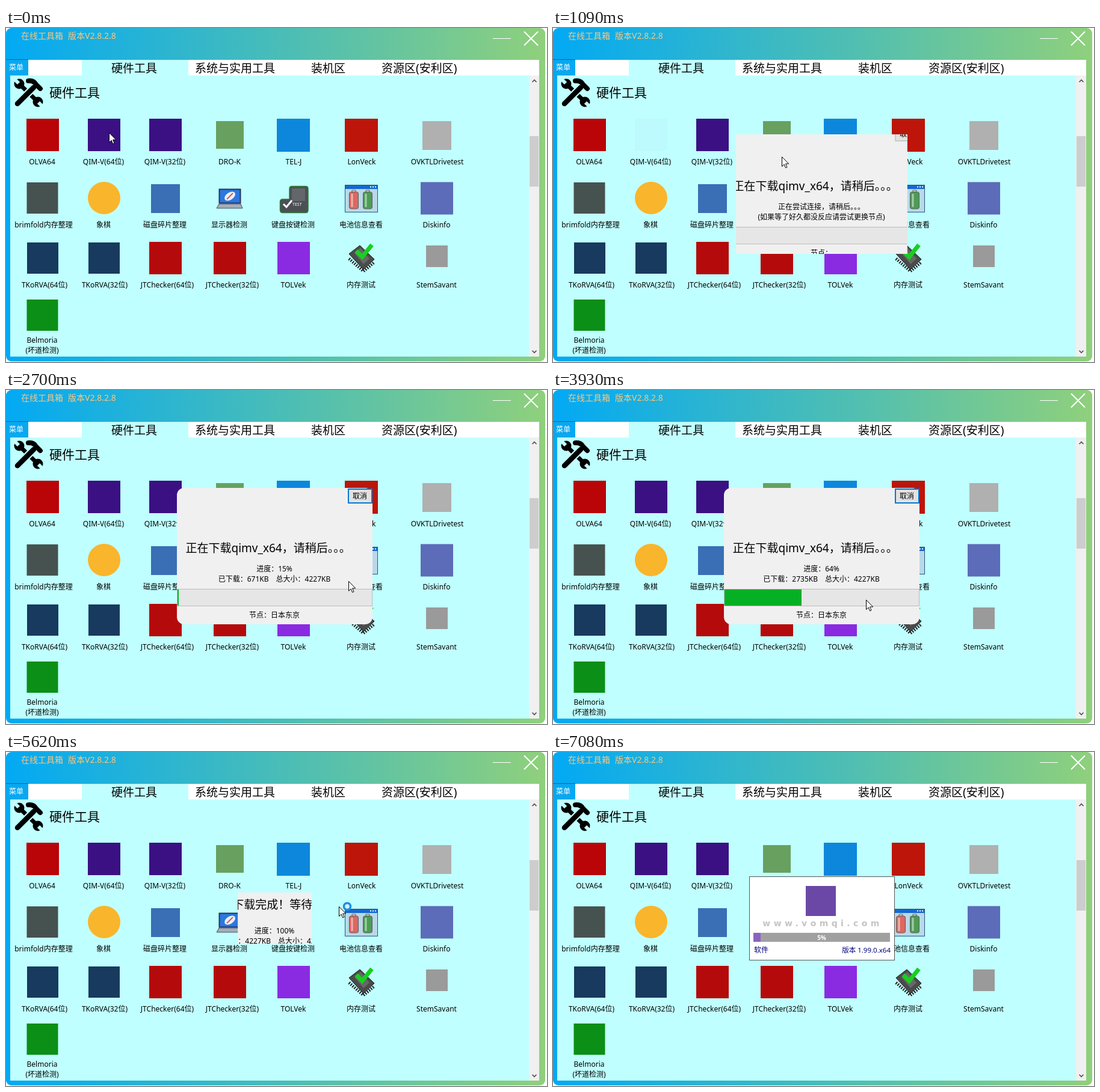
Write an HTML page that moves like this. It is 899 px wide and 556 px high and loops after 7770 ms.

```html
<!DOCTYPE html>
<html lang="zh-CN">
<head>
<meta charset="utf-8">
<title>在线工具箱</title>
<style>
html, body { margin: 0; width: 100%; height: 100%; overflow: hidden; background: #fff; }
svg { display: block; width: 899px; height: 556px; }
text { font: 12px 'Noto Sans', 'Noto Sans CJK SC', 'Noto Sans CJK', sans-serif; }
.tab { font-size: 19px; }
.mid { text-anchor: middle; }
.url { font: bold 14px 'DejaVu Sans', sans-serif; letter-spacing: 5.4px; }
</style>
</head>
<body>
<svg viewBox="0 0 899 556" xmlns="http://www.w3.org/2000/svg">
  <defs>
    <linearGradient id="frame"><stop stop-color="#02a9f4"/><stop offset="1" stop-color="#8fd07c"/></linearGradient>
    <linearGradient id="shine">
      <stop stop-color="#fff" stop-opacity="0"/>
      <stop offset=".55" stop-color="#fff" stop-opacity=".45"/>
      <stop offset="1" stop-color="#fff" stop-opacity="0"/>
    </linearGradient>
    <clipPath id="reveal"><rect id="revealBox"/></clipPath>
    <clipPath id="fill"><rect id="fillBox" x="285" y="332" height="27"/></clipPath>
  </defs>

  <!-- window -->
  <rect width="896" height="555" rx="9" fill="url(#frame)"/>
  <rect x="7" y="53" width="879" height="494" fill="#fff"/>
  <rect x="126" y="53" width="177" height="27" fill="#c0ffff"/>
  <rect x="7" y="79" width="862" height="468" fill="#c0ffff"/>
  <rect y="53" width="37" height="26" fill="#08a8f0"/>
  <path d="M0 52.5H37" stroke="#17608a"/>
  <text x="5" y="70" fill="#fff">菜单</text>
  <g fill="#ffc67c">
    <text x="25" y="17.5" style="font-size:14px">在线工具箱</text>
    <text x="103" y="17.5" style="font-size:14px">版本V2.8.2.8</text>
  </g>
  <path d="M809 17.5H839" stroke="#fff"/>
  <path d="M861 6L884 29M884 6L861 29" stroke="#fff" stroke-width="2"/>
  <text class="tab" x="175" y="74">硬件工具</text>
  <text class="tab" x="314" y="74">系统与实用工具</text>
  <text class="tab" x="507" y="74">装机区</text>
  <text class="tab" x="624" y="74">资源区(安利区)</text>
  <rect x="869" y="79" width="17" height="468" fill="#f0f0f0"/>
  <rect x="870" y="180" width="15" height="84" fill="#cdcdcd"/>
  <path d="M874.5 90L878 86.5L881.5 90M874.5 537L878 540.5L881.5 537" fill="none" stroke="#505050" stroke-width="1.7"/>

  <!-- heading -->
  <g fill="none" stroke-linecap="round">
    <path d="M23 94L53 123" stroke="#000" stroke-width="7"/>
    <g fill="#000"><circle cx="22" cy="93" r="8.5"/><circle cx="53" cy="123" r="8.5"/></g>
    <path d="M15 86L21 92M60 130L54 124" stroke="#c0ffff" stroke-width="6" stroke-linecap="butt"/>
    <path d="M19 126L46 99" stroke="#c0ffff" stroke-width="13"/>
    <path d="M19 126L46 99" stroke="#000" stroke-width="8.5"/>
    <path d="M37 88Q46 87 50 94L57 101" stroke="#000" stroke-width="8"/>
  </g>
  <text x="72" y="115" style="font-size:21px">硬件工具</text>

  <g id="icons"></g>
  <g id="labels" class="mid"></g>

  <!-- pictograms -->
  <g>
    <rect x="354.5" y="268.5" width="35" height="23" fill="#2b78e0" stroke="#26365e" stroke-width="2"/>
    <ellipse cx="372" cy="280" rx="10" ry="6" transform="rotate(-35 372 280)" fill="#e8f2ff"/>
    <path d="M367 285L377 275" stroke="#e0554a" stroke-width="2"/>
    <path d="M354 293H390L393 300H350Z" fill="#a7adb8" stroke="#454c5c"/>
  </g>
  <g>
    <path d="M475 263.5H498Q502 263.5 502 268V303Q502 307.5 498 307.5H460Q455.5 307.5 455.5 303V289Q455.5 285 460 285H471V268Q471 263.5 475 263.5Z" fill="#4c5054" stroke="#267d36" stroke-width="1.5"/>
    <path d="M475 267H497V288H475Z" fill="#63676a"/>
    <path d="M461 293L466 298L475 287" fill="none" stroke="#fff" stroke-width="3"/>
    <text x="476" y="296" fill="#fff" style="font-size:7px">TEST</text>
  </g>
  <g>
    <rect x="563.5" y="261.5" width="54" height="45" fill="#b9d8ea" stroke="#26577c"/>
    <rect x="564" y="262" width="53" height="6" fill="#1668cf"/>
    <path d="M605 264.5H615" stroke="#fff" stroke-width="2" stroke-dasharray="2 2"/>
    <g stroke="#59605d">
      <path d="M575 270H581V273H575ZM598 270H604V273H598Z" fill="#ddd"/>
      <rect x="570.5" y="273" width="15" height="28" rx="3" fill="#dc6860"/>
      <rect x="593.5" y="273" width="15" height="28" rx="3" fill="#4c9c55"/>
    </g>
    <path d="M575 276V298M598 276V298" stroke="#fff" stroke-opacity=".5" stroke-width="3"/>
  </g>
  <g>
    <path d="M570 384L594 405L612 390" fill="none" stroke="#222" stroke-width="5" stroke-dasharray="2 2"/>
    <path d="M570 376L588 362L612 385L594 402Z" fill="#4b4b4b" stroke="#161616"/>
    <path d="M579 375L589 366L604 384L594 393Z" fill="#686868"/>
    <path d="M582 371L592 381L608 361" fill="none" stroke="#18cf20" stroke-width="7"/>
  </g>

  <!-- download dialog -->
  <g id="dialog" clip-path="url(#reveal)">
    <rect x="284" y="163" width="325" height="227" rx="12" fill="#f0f0f0"/>
    <rect id="button" x="569" y="165" width="39" height="23" fill="#e1e1e1"/>
    <text class="mid" x="588" y="181">取消</text>
    <text id="title" class="tab"></text>
    <text id="line1" class="mid" x="446" y="302"></text>
    <text id="line2" class="mid" x="446" y="319"></text>
    <rect x="284.5" y="331.5" width="324" height="28" fill="#e6e6e6" stroke="#bcbcbc"/>
    <g clip-path="url(#fill)">
      <rect x="285" y="332" width="324" height="27" fill="#06b025"/>
      <rect id="glow" y="332" width="150" height="27" fill="url(#shine)"/>
    </g>
    <text id="node" class="mid" x="446" y="379"></text>
  </g>

  <!-- splash -->
  <g id="splash">
    <rect x="326.5" y="207.5" width="241" height="139" fill="#fff" stroke="#555"/>
    <rect x="420" y="223" width="50" height="50" fill="#6c48a6"/>
    <text class="url mid" x="448" y="290" fill="#c4c4c4">www.vomqi.com</text>
    <rect x="333" y="301" width="227" height="15" fill="#a0a0a0"/>
    <rect x="333" y="301" width="12" height="15" fill="#8a62c2"/>
    <text class="mid" x="446.5" y="312.5" fill="#fff" style="font-size:10px;font-weight:bold">5%</text>
    <text x="334" y="334" fill="#000080">软件</text>
    <text x="561" y="334" fill="#000080" text-anchor="end" style="font-size:11.5px">版本 1.99.0.x64</text>
  </g>

  <g id="cursor">
    <path d="M.5 .5V16.5L4.2 13L6.6 18.8L9 17.7L6.6 12H11.7Z" fill="#fff" stroke="#000"/>
    <circle id="busy" cx="14" cy="0" r="5.5" fill="#d8f2ff" stroke="#1c8fe0" stroke-width="3.5"/>
  </g>
</svg>
<script>
const $ = id => document.getElementById(id);
const set = (id, attrs) => { for (const k in attrs) $(id).setAttribute(k, attrs[k]); };
const show = (id, on) => set(id, { display: on ? 'inline' : 'none' });
const say = (id, text) => { if ($(id).textContent !== text) $(id).textContent = text; };

// centre x, centre y, side, colour
const squares = [
  [61, 178, 54, '#b90408'], [163, 178, 54, '#3b1083'], [265, 178, 54, '#3b1083'],
  [372, 178, 46, '#68a060'], [477.5, 178.5, 55, '#0d87dc'], [590.5, 178.5, 55, '#bd1509'],
  [716, 179, 48, '#b0b0b0'], [60.5, 283, 52, '#46524f'], [265, 284, 48, '#3a6fb5'],
  [716, 283.5, 54, '#5c6cb8'], [61, 383, 52, '#173a5e'], [163, 383, 52, '#173a5e'],
  [265, 383, 54, '#b50a0b'], [372, 383, 54, '#b50a0b'], [478, 383, 54, '#8a2be2'],
  [716, 380, 36, '#9a9a9a'], [60.5, 478, 52, '#0b8f17']
];
$('icons').innerHTML = squares.map(([x, y, s, c], i) =>
  `<rect id="icon${i}" x="${x - s / 2}" y="${y - s / 2}" width="${s}" height="${s}" fill="${c}"/>`
).join('') + '<circle cx="163" cy="283" r="27" fill="#f9b52c"/>';

const rows = [
  [227, [60, 162, 264, 371.5, 478, 591, 716.5],
    'OLVA64 QIM-V(64位) QIM-V(32位) DRO-K TEL-J LonVeck OVKTLDrivetest'],
  [332, [62.5, 162, 264, 371, 477, 590, 715.5],
    'brimfold内存整理 象棋 磁盘碎片整理 显示器检测 键盘按键检测 电池信息查看 Diskinfo'],
  [432, [64, 164, 268, 376, 477.5, 590, 715.5],
    'TKoRVA(64位) TKoRVA(32位) JTChecker(64位) JTChecker(32位) TOLVek 内存测试 StemSavant'],
  [524, [60], 'Belmoria'],
  [541, [60], '(坏道检测)']
];
$('labels').innerHTML = rows.map(([y, xs, names]) =>
  names.split(' ').map((n, i) => `<text x="${xs[i]}" y="${y}">${n}</text>`).join('')
).join('');

const LOOP = 7770, FIRST = 170, STEP = 76.78, LAST = 91;
const CX = 446.5, CY = 276.5;

// keys are [step, value, ...]
function at(keys, n, col = 1) {
  const i = keys.findIndex(k => k[0] > n);
  if (i === 0) return keys[0][col];
  if (i < 0) return keys[keys.length - 1][col];
  const a = keys[i - 1], b = keys[i];
  return a[col] + (b[col] - a[col]) * (n - a[0]) / (b[0] - a[0]);
}

const path = [
  [0, 171, 174], [3, 171, 174], [13, 380, 214], [18, 540, 246], [22, 618, 236],
  [24, 616, 224], [29, 600, 285], [34, 569, 318], [44, 556, 346], [50, 520, 349],
  [55, 554, 338], [61, 563, 288], [67, 575, 268], [72, 553, 257], [77, 578, 285],
  [88, 851, 545]
];
const press = [[1, 1], [6, .02], [14, .02], [20, 1]];
const loaded = [[29, 0], [34, 671], [50, 2735], [59, 4227]];
const bar = [[30, 285], [34, 287], [44, 370], [50, 413], [61, 520], [70, 609]];

function drawDialog(n) {
  const size = Math.max(0, Math.min(1, (n - 3) * .0876, (77 - n) * .0755));
  show('dialog', size > 0);
  if (!size) return;
  const w = 325 * size, h = 227 * size;
  set('revealBox', { x: CX - w / 2, y: CY - h / 2, width: w, height: h });

  const active = n > 14;
  set('button', { stroke: active ? '#0078d7' : '#adadad', 'stroke-width': active ? 2 : 1 });

  const done = n >= 63;
  set('title', { x: done ? 292 : 298.5, y: done ? 261 : 270 });
  say('title', done ? 'qimv_x64下载完成！等待软件启动。' : '正在下载qimv_x64，请稍后。。。');

  const kb = Math.round(at(loaded, n));
  const running = n >= 31;
  say('line1', running ? `进度：${Math.floor(kb / 42.27 + 1e-6)}%` : '正在尝试连接，请稍后。。。');
  say('line2', running ? `已下载：${kb}KB\u3000总大小：4227KB` : '(如果等了好久都没反应请尝试更换节点)');
  say('node', n >= 18 ? '节点：日本东京' : '节点：');

  set('fillBox', { width: at(bar, n) - 285 });
  set('glow', { x: 290 + (n - 61) * 24 });
}

function draw(ms) {
  const t = ms % LOOP;
  const n = t < FIRST ? 0 : Math.min(LAST, 1 + Math.floor((t - FIRST) / STEP + .1));
  set('icon1', { opacity: at(press, n) });
  drawDialog(n);
  show('splash', n >= 82);
  show('cursor', n < LAST);
  show('busy', n >= 67 && n < 84);
  set('cursor', { transform: `translate(${Math.round(at(path, n))} ${Math.round(at(path, n, 2))})` });
}

const start = performance.now();
function tick() {
  draw(performance.now() - start);
  requestAnimationFrame(tick);
}
tick();
</script>
</body>
</html>
```
